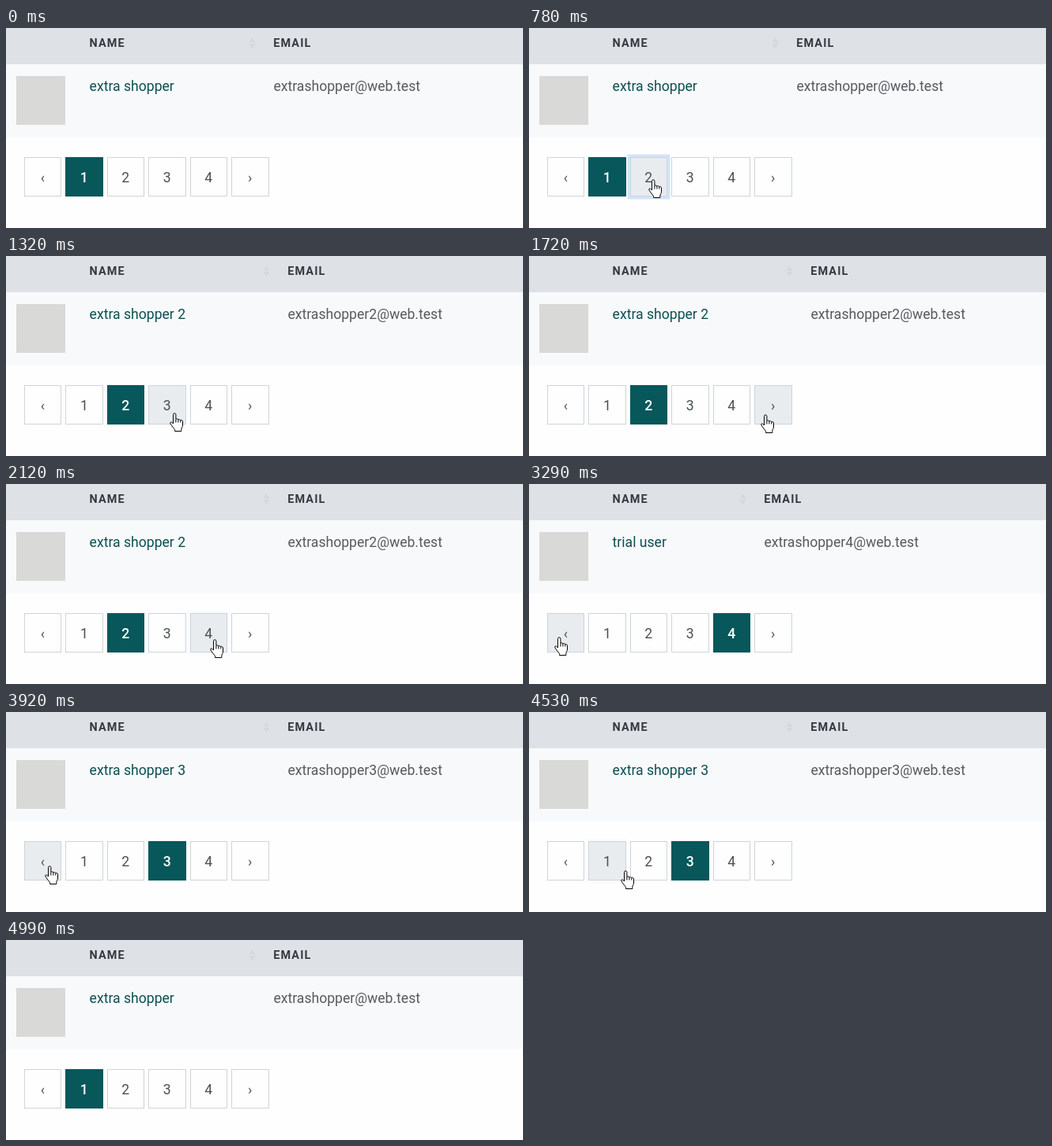
An HTML page that plays this animation: 654x254 px, repeating every 5.79 s.

```html
<!DOCTYPE html>
<html lang="en">
<head>
<meta charset="utf-8">
<title>Customer table paging</title>
<style>
html, body { margin: 0; width: 100%; height: 100%; overflow: hidden; background: #fefefe; }
svg { display: block; }
text { font: 17.6px Roboto, Arial, sans-serif; fill: #555a60; }
.head { font-size: 14.4px; font-weight: 700; letter-spacing: 1.15px; fill: #343a40; }
#name { fill: #0b4f53; }
#sort { fill: #d5d9dd; }
.page rect { fill: #fefefe; stroke: #ced4da; }
.page text { text-anchor: middle; fill: #495057; }
.page .ring { fill: #cfe3f8; stroke: none; }
.hover .box { fill: #e9ecef; }
.active .box { fill: #07575b; stroke: #07575b; }
.active text { fill: #fff; font-weight: 500; }
#hand { fill: #fff; stroke: #000; stroke-linejoin: round; }
</style>
</head>
<body>
<svg width="654" height="254">
  <rect width="654" height="46" fill="#dee2e6"/>
  <rect y="46" width="654" height="93" fill="#f8f9fb"/>
  <rect x="13" y="61" width="62" height="62" fill="#d9d9d7"/>
  <text class="head" x="105.5" y="24">NAME</text>
  <text id="name" x="105.6" y="80"></text>
  <g id="column">
    <path id="sort" d="M-31 18.5l4.3-6.5 4.3 6.5zM-31 20l4.3 6.5 4.3-6.5z"/>
    <text class="head" y="24">EMAIL</text>
    <text id="email" x=".2" y="80"></text>
  </g>
  <g id="pages"></g>
  <g id="hand">
    <path d="M4.5 14V2.5a1.7 1.7 0 0 1 3.4 0V8.5c.3-1 3-.9 3 .6c.3-.9 2.8-.7 2.9.7c.5-.8 2.7-.3 2.7 1.3V16c0 2-1.7 3.5-1.7 5.2v2.3h-8.2v-2C5 19.5 2.5 16.5 1 14C0 11.5 2.5 11 4.5 14z"/>
    <path d="M7.9 8.5V12.5M10.9 9V12.5M13.8 10V12.5" fill="none"/>
  </g>
</svg>
<script>
const LOOP = 5790, FADE = 150;
const $ = id => document.getElementById(id);
const clamp = u => Math.min(1, Math.max(0, u));
const ease = u => u * u * (3 - 2 * u);

const rows = [
  { name: 'extra shopper', email: 'extrashopper@web.test', column: 338.2 },
  { name: 'extra shopper 2', email: 'extrashopper2@web.test', column: 356.2 },
  { name: 'extra shopper 3', email: 'extrashopper3@web.test', column: 356.2 },
  { name: 'trial user', email: 'extrashopper4@web.test', column: 297.2 }
];

const clicks = [
  { press: 640, load: 1000, button: 2, next: 2 },
  { press: 2105, load: 2260, button: 4, next: 4 },
  { press: 3400, load: 3700, button: 0, next: 3 },
  { press: 4520, load: 4760, button: 1, next: 1 }
];

// fingertip moves: start, end, goal x and y; it rests in between
const entry = [314, 258];
const moves = [
  [60, 520, 150, 178],
  [520, 740, 157, 192],
  [860, 1320, 213, 199],
  [1390, 1720, 299, 201],
  [1720, 2110, 264, 197],
  [2830, 3290, 38, 194],
  [3440, 3910, 55, 195],
  [4000, 4450, 122, 201],
  [4620, 4980, 104, 258]
];

const buttons = [...'‹1234›'].map((label, i) => {
  const x = 23 + 52.45 * i, left = Math.round(x), right = Math.round(x + 47.45);
  const g = document.createElementNS('http://www.w3.org/2000/svg', 'g');
  g.innerHTML = `
    <rect class="ring" x="${left - 3.5}" y="160.5" width="${right - left + 7}" height="57"/>
    <rect class="box" x="${left + .5}" y="164.5" width="${right - left - 1}" height="49"/>
    <text x="${x + 23.4}" y="196">${label}</text>`;
  $('pages').append(g);
  return { g, left, right, ring: g.querySelector('.ring') };
});

function tipAt(t) {
  let [x, y] = entry;
  for (const [start, end, toX, toY] of moves) {
    const u = ease(clamp((t - start) / (end - start)));
    x += (toX - x) * u;
    y += (toY - y) * u;
  }
  return [Math.round(x), Math.round(y)];
}

function draw(now) {
  const t = now % LOOP;
  const [x, y] = tipAt(t);
  const page = clicks.reduce((p, c) => t >= c.load ? c.next : p, 1);
  const click = clicks.find(c => t >= c.press && t < c.load);

  const { name, email, column } = rows[page - 1];
  $('name').textContent = name;
  $('email').textContent = email;
  $('column').setAttribute('transform', `translate(${column} 0)`);

  buttons.forEach(({ g, left, right, ring }, i) => {
    const over = x >= left && x < right && y >= 164 && y < 214;
    g.setAttribute('class', 'page' + (over ? ' hover' : '') + (i === page ? ' active' : ''));
    ring.setAttribute('opacity', click?.button === i ? clamp((t - click.press) / FADE) : 0);
  });
  $('hand').setAttribute('transform', `translate(${x - 6} ${y})`);
  requestAnimationFrame(draw);
}
requestAnimationFrame(draw);
</script>
</body>
</html>
```
